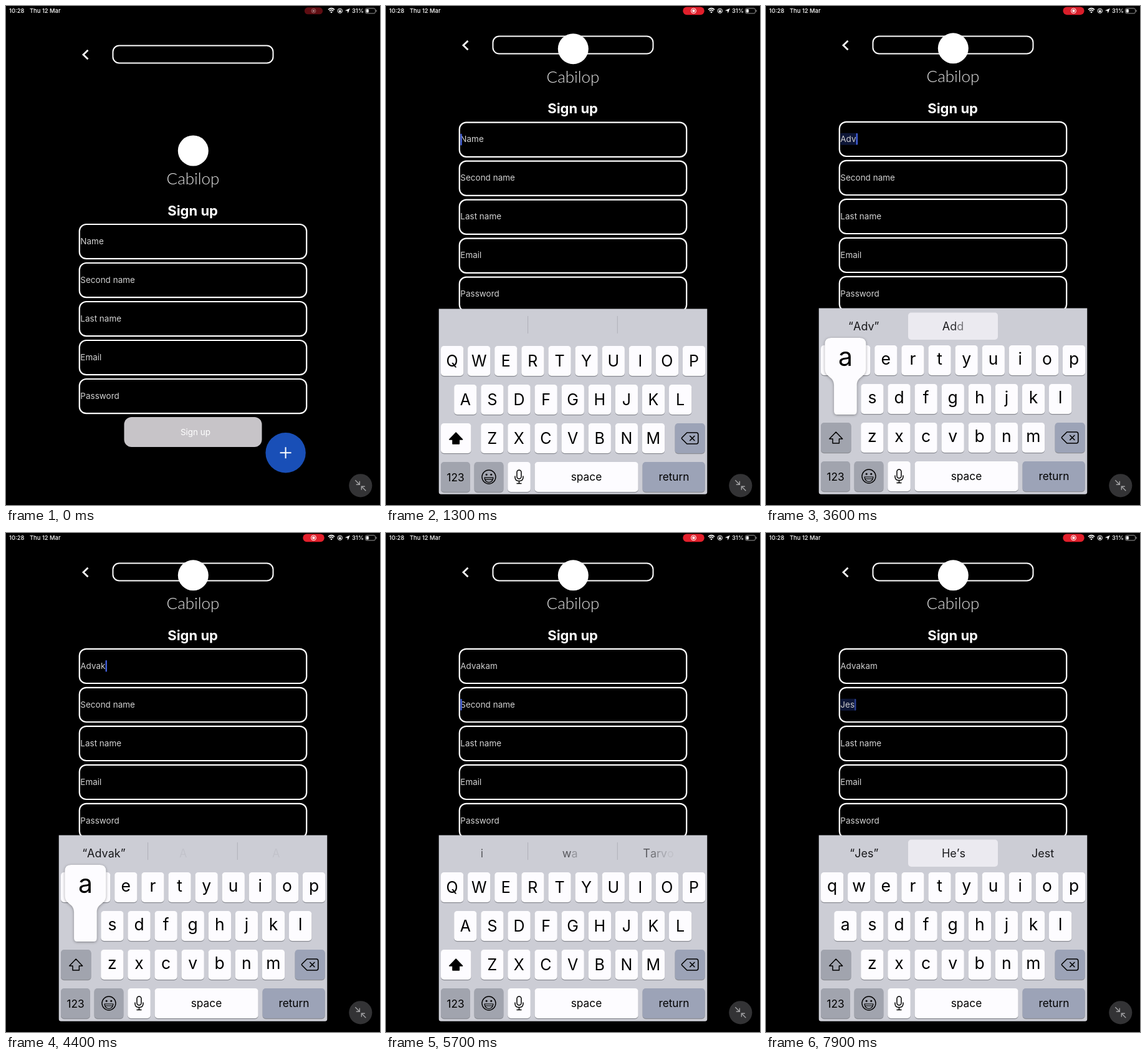
These frames come from a looping animation (600x800 px, 8 s). An HTML page with a canvas:

```html
<!DOCTYPE html>
<html lang="en">
<head>
<meta charset="utf-8">
<title>Sign up form</title>
<style>
html, body { margin: 0; width: 100%; height: 100%; overflow: hidden; background: #000; }
canvas { display: block; width: 600px; height: 800px; }
</style>
</head>
<body>
<canvas id="stage"></canvas>
<script>
const LOOP = 8000, STEP = 100;
const canvas = document.getElementById('stage');
const ratio = window.devicePixelRatio || 1;
canvas.width = 600 * ratio;
canvas.height = 800 * ratio;
const c = canvas.getContext('2d');

const KEY = '#fdfcff', GRAY = '#a1a4ae', BLUE_GRAY = '#9ca3b7', BOARD = '#cccdd5';
const ROWS = ['qwertyuiop', 'asdfghjkl', 'zxcvbnm'];
const ROW_X = [88, 109.2, 152.2];
const PITCH = 43.1, ROW_H = 62;
const LABELS = ['Name', 'Second name', 'Last name', 'Email', 'Password'];
const SLIDE = 800, FOCUS = 900, NEXT_FIELD = 5600;

// Pressed keys: [from, to, key]
const PRESSES = [
  [2300, 2500, 'a'], [2700, 2900, 'd'], [3200, 3400, 'v'], [3500, 3700, 'a'],
  [4200, 4400, 'k'], [4400, 4600, 'a'], [4800, 5000, 'm'],
  [6500, 6700, 'j'], [6900, 7100, 'e'], [7200, 7400, 's']
];

// Input states: time, field, text, suggestions, whether autocorrect is offered
const STATES = [
  [0, 0, '', []],
  [2500, 0, 'A', ['A', 'And', 'At']],
  [2900, 0, 'Ad', ['“Ad”', 'Add', 'Adds']],
  [3400, 0, 'Adv', ['“Adv”', 'Add', ''], true],
  [3700, 0, 'Adva', ['“Adva”', 'Advance', '']],
  [4400, 0, 'Advak', ['“Advak”', 'Adds', 'And']],
  [4600, 0, 'Advaka', ['“Advaka”', '', '']],
  [5000, 0, 'Advakam', ['“Advakam”', '', '']],
  [NEXT_FIELD, 1, '', ['i', 'was', 'Tarvold']],
  [6700, 1, 'J', ['J', 'Just', 'Jan']],
  [7100, 1, 'Je', ['“Je”', 'Jet', 'Jest']],
  [7400, 1, 'Jes', ['“Jes”', 'He’s', 'Jest'], true]
];

const clamp = v => Math.max(0, Math.min(1, v));

// Critically damped slide from 0 to 1
function slide(t, rate) {
  const s = Math.max(0, t - SLIDE) / 1000 * rate;
  return s > 10 ? 1 : 1 - (1 + s) * Math.exp(-s);
}

function font(size, weight = 400, family = 'Inter') {
  c.font = `${weight} ${size}px ${family}, "Noto Sans", sans-serif`;
}
function text(str, x, y, color, align = 'left') {
  c.textAlign = align;
  c.fillStyle = color;
  c.fillText(str, x, y);
}
function box(x, y, w, h, r, fill, stroke, width) {
  c.beginPath();
  c.roundRect(x, y, w, h, r);
  paint(fill, stroke, width);
}
function disc(x, y, r, fill, stroke, width) {
  c.beginPath();
  c.arc(x, y, r, 0, 7);
  paint(fill, stroke, width);
}
function path(d, x, y, fill, stroke, width) {
  c.save();
  c.translate(x, y);
  const p = new Path2D(d);
  if (fill) { c.fillStyle = fill; c.fill(p); }
  if (stroke) { c.strokeStyle = stroke; c.lineWidth = width; c.stroke(p); }
  c.restore();
}
function paint(fill, stroke, width) {
  if (fill) { c.fillStyle = fill; c.fill(); }
  if (stroke) { c.strokeStyle = stroke; c.lineWidth = width; c.stroke(); }
}

function statusBar(t) {
  font(9.4, 500);
  text('10:28', 5, 11.3, '#fff');
  text('Thu 12 Mar', 38, 11.3, '#fff');
  text('31%', 574, 11.3, '#fff', 'right');

  const dip = Math.max(0, Math.cos(t / 1650 * 2 * Math.PI)) ** 3;
  c.save();
  c.globalAlpha = 1 - 0.58 * dip;
  c.translate(493.5, 7.8);
  c.scale(1 - 0.15 * dip, 1 - 0.15 * dip);
  box(-17.2, -6.4, 34.4, 12.8, 6.2, '#e3202c');
  disc(0, 0, 4, null, '#fff', 1);
  disc(0, 0, 2.2, '#fff');
  c.restore();

  c.lineCap = 'butt';
  path('M-5 -1.7Q0 -6 5 -1.7M-3.2 .3Q0 -2.5 3.2 .3', 522, 7.5, null, '#fff', 1.6);
  path('M-1.8 1.6Q0 0 1.8 1.6L0 3.6Z', 522, 8, '#fff');
  disc(535.8, 7.8, 3.7, null, '#fff', 1);
  box(534.1, 7.2, 3.4, 2.7, 0.5, '#fff');
  path('M-1.1 0V-1Q0 -2.4 1.1 -1V0', 535.8, 7.4, null, '#fff', 0.8);
  path('M4 -4L.6 4L0 0L-4 -.6Z', 547.8, 7.8, '#fff');
  box(576.5, 3.7, 16, 8.2, 2.4, null, '#999', 1);
  box(577.8, 5, 4, 5.6, 1, '#fff');
  box(593.6, 6.3, 1.2, 3, 0.6, '#999');
}

function form(t, state) {
  const [since, active, typed, , correcting] = state;
  const shift = slide(t, 14.75);
  const top = -15 * shift, y = -164.2 * shift;
  c.lineCap = 'butt';
  path('M5 -7.2L-2.5 0L5 7.2', 126.5, 78 + top, null, '#fff', 2.8);
  box(171.5, 63.5 + top, 257, 28, 10, null, '#fff', 2);

  disc(300.3, 232 + y, 24.5, '#fff');
  font(26, 300, 'Lato');
  text('Cabilop', 300, 286 + y, '#e4e4e4', 'center');
  font(22, 700);
  text('Sign up', 299.6, 335.8 + y, '#fff', 'center');

  LABELS.forEach((label, i) => {
    const fy = 350 + i * 62 + y;
    box(117.8, fy, 364.4, 55.2, 11, null, '#fff', 2.2);
    const value = i === active ? typed : i < active ? 'Advakam' : '';
    font(13.5);
    const width = value ? c.measureText(value).width : 0;
    const focused = i === active && t >= FOCUS - 100;
    if (focused && correcting) box(119.5, fy + 18, width + 2, 19, 1, '#0d1637');
    text(value || label, 119.3, fy + 31.8, value ? '#cdcdcd' : '#d2d2d2');
    if (focused) {
      const phase = Math.max(0, t - Math.max(since, FOCUS)) % 1000;
      c.globalAlpha = phase < 500 ? 1 : phase < 600 ? (typed ? 0.55 : 0.9) : phase < 900 ? 0 : 0.5;
      box(119.4 + width, fy + 18.2, 2.4, 18.6, 1, '#4361dc');
      c.globalAlpha = 1;
    }
  });

  box(189.5, 659 + y, 221, 48, 12, '#c7c4c8');
  font(13.5);
  text('Sign up', 304, 687.6 + y, '#fff', 'center');
  disc(448.6, 716.2 + y, 32.2, '#194fb7');
  path('M-9 0H9M0 -9V9', 448.6, 716.2 + y, null, '#fff', 2);
}

function key(x, y, w, color) {
  box(x, y + 1, w, 48.2, 5, '#8b8d94');
  box(x, y, w, 48, 5, color);
}

function suggestions(t, state) {
  const [since, , , words, correcting] = state;
  if (correcting) box(228, 491.5, 144, 43.5, 5, '#ebeaf0');
  else [227.6, 371.3].forEach(x => box(x - 0.5, 496, 1, 28, 0, '#b0b1b9'));
  font(18);
  words.forEach((word, i) => {
    let x = 156 + 144 * i - c.measureText(word).width / 2;
    if (word.length === 1) x -= 2;
    const quoted = word[0] === '“';
    [...word].forEach((ch, n) => {
      c.globalAlpha = quoted ? 1 : clamp((t - since) / 170 + 0.05 - n / word.length);
      text(ch, x, 519.5, '#18181b');
      x += c.measureText(ch).width;
    });
    c.globalAlpha = 1;
  });
}

function popup(letter, upper) {
  const row = ROWS.findIndex(r => r.includes(letter));
  const x = ROW_X[row] + ROWS[row].indexOf(letter) * PITCH + 18.2;
  const y = 532 + (row - 1) * ROW_H;
  c.save();
  c.shadowColor = 'rgba(0,0,0,.35)';
  c.shadowBlur = 4 * ratio;
  c.shadowOffsetY = ratio;
  path('M-23 0H23Q33 0 33 10V49C33 64 18.3 61 18.3 76V118Q18.3 123 13.3 123' +
    'H-13.3Q-18.3 123 -18.3 118V76C-18.3 61 -33 64 -33 49V10Q-33 0 -23 0Z', x, y, KEY);
  c.restore();
  font(upper ? 38.5 : 41);
  text(upper ? letter.toUpperCase() : letter, x, y + (upper ? 47 : 45), '#000', 'center');
}

function keyboard(t, state) {
  const upper = !state[2];
  c.save();
  c.beginPath();
  c.roundRect(84.5, 0, 431, 782.7, [0, 0, 4, 4]);
  c.clip();
  c.translate(0, 298.4 * (1 - slide(t, 15.65)));
  box(84.5, 484.5, 431, 299, 0, BOARD);
  suggestions(t, state);

  ROWS.forEach((row, r) => [...row].forEach((ch, i) => {
    const x = ROW_X[r] + i * PITCH, y = 544 + r * ROW_H;
    key(x, y, 36.3, KEY);
    font(upper ? 25 : 26.5);
    text(upper ? ch.toUpperCase() : ch, x + 18.1, y + (upper ? 33.3 : 31), '#000', 'center');
  }));

  key(88, 668, 48.5, upper ? KEY : GRAY);
  c.lineJoin = 'round';
  path('M0 -9.5L10.5 1.5H5.2V8.5H-5.2V1.5H-10.5Z', 112.2, 692.5, upper ? '#000' : null, '#000', 1.5);
  key(463.6, 668, 48, BLUE_GRAY);
  path('M-5 -9H10Q13 -9 13 -6V6Q13 9 10 9H-5L-13 1Q-14 0 -13 -1Z' +
    'M-.5 -4L7.5 4M7.5 -4L-.5 4', 487.8, 692, null, '#000', 1.6);

  const returning = t >= 5300 && t < 5500;
  key(88, 730, 46.8, GRAY);
  key(141.6, 730, 46.8, GRAY);
  key(195.3, 730, 36.5, KEY);
  key(238.6, 730, 166, KEY);
  key(411.6, 730, 100, returning ? KEY : BLUE_GRAY);
  font(17.3);
  text('123', 111.5, 760.5, '#000', 'center');
  text('space', 321.5, 759.5, '#000', 'center');
  text('return', 462, 759.5, '#000', 'center');

  disc(165, 754, 11, null, '#000', 1.4);
  disc(161.2, 750.3, 1.5, '#000');
  disc(168.8, 750.3, 1.5, '#000');
  path('M-7 0H7Q6 7.5 0 7.5Q-6 7.5 -7 0ZM-6 3H6', 165, 755, null, '#000', 1.2);
  box(210, 743, 7, 14, 3.5, null, '#000', 1.5);
  path('M-6.5 0V2Q-6.5 8 0 8Q6.5 8 6.5 2V0M0 8V12M-4 12H4', 213.5, 752.5, null, '#000', 1.5);
  c.lineJoin = 'miter';
  c.restore();

  const pressed = PRESSES.find(([from, to]) => t >= from && t < to);
  if (pressed) popup(pressed[2], upper);
}

function cornerButton() {
  disc(568.8, 768.8, 18.6, '#333335');
  path('M-8.5 -8.5L-1.5 -1.5M-1.5 -7V-1.5H-7M8.5 8.5L1.5 1.5M1.5 7V1.5H7',
    568.8, 768.8, null, '#a2a2a4', 1.4);
}

function draw(t) {
  c.setTransform(ratio, 0, 0, ratio, 0, 0);
  c.fillStyle = '#000';
  c.fillRect(0, 0, 600, 800);
  const state = STATES.filter(s => s[0] <= t).pop();
  form(t, state);
  if (t > SLIDE) keyboard(t, state);
  statusBar(t);
  cornerButton();
}

const start = performance.now();
function tick(now) {
  const t = Math.max(0, now - start) % LOOP;
  draw(Math.floor(t / STEP) * STEP);
  requestAnimationFrame(tick);
}
draw(0);
requestAnimationFrame(tick);
</script>
</body>
</html>
```
